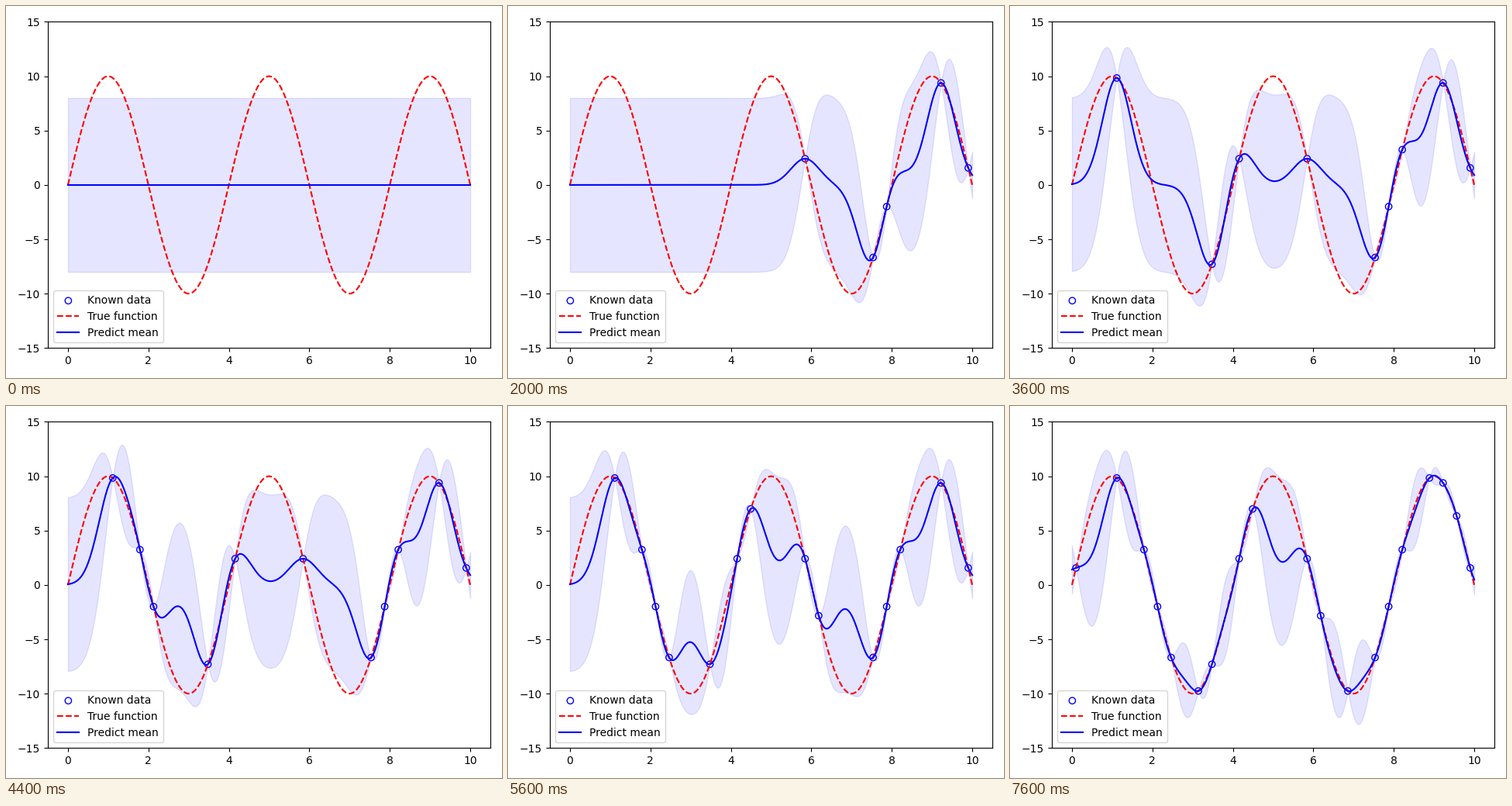
Animation, 640 px wide and 480 px high, one loop 8000 ms. Source, as a matplotlib script:

```python
import numpy as np
import matplotlib.pyplot as plt
from matplotlib.animation import FuncAnimation

SIGMA = 4.0
LENGTH_SQ = 0.125
FRAMES = 20

# Candidate positions and the order in which they are sampled.
candidates = np.linspace(0.1, 9.9, 30)
order = [17, 27, 22, 29, 23, 24, 3, 12, 10, 5,
         6, 13, 18, 7, 28, 0, 20, 9, 26]
grid = np.linspace(0, 10, 1000)


def true_function(x):
    return 10 * np.sin(np.pi * x / 2)


def kernel(a, b):
    return SIGMA**2 * np.exp(-np.subtract.outer(a, b)**2 / (2 * LENGTH_SQ))


def predict(known):
    """Posterior mean and standard deviation of the Gaussian process."""
    if len(known) == 0:
        return np.zeros_like(grid), np.full_like(grid, SIGMA)
    cov = kernel(known, known) + 1e-8 * np.eye(len(known))
    cross = kernel(known, grid)
    weights = np.linalg.solve(cov, cross)
    mean = weights.T @ true_function(known)
    variance = SIGMA**2 - np.sum(cross * weights, axis=0)
    return mean, np.sqrt(np.maximum(variance, 0))


fig, ax = plt.subplots(figsize=(6.4, 4.8), dpi=100)


def update(frame):
    known = candidates[order[:frame]]
    mean, std = predict(known)
    ax.clear()
    ax.scatter(known, true_function(known), s=36, facecolors="none",
               edgecolors="b", label="Known data")
    ax.plot(grid, true_function(grid), "r--", label="True function")
    ax.plot(grid, mean, "b", label="Predict mean")
    ax.fill_between(grid, mean - 2 * std, mean + 2 * std,
                    color="b", alpha=0.1)
    ax.set_xlim(-0.5, 10.5)
    ax.set_ylim(-15, 15)
    ax.legend(loc="lower left")
    return []


update(0)
fig.tight_layout()
anim = FuncAnimation(fig, update, frames=FRAMES, interval=400,
                     init_func=lambda: [], repeat=True, repeat_delay=0)
plt.show()
```
